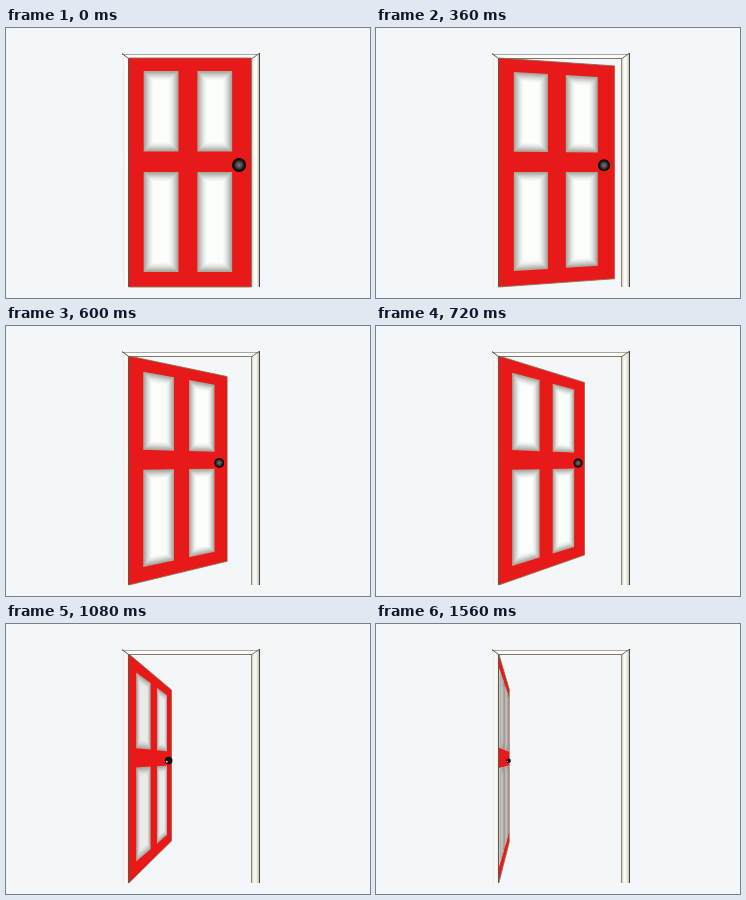
An HTML page with a canvas that plays this animation: 364x270 px, repeating every 2220 ms.

```html
<!DOCTYPE html>
<html lang="en">
<head>
<meta charset="utf-8">
<title>Opening door</title>
<style>
html, body { margin: 0; width: 100%; height: 100%; overflow: hidden; background: #f4f7fa; }
canvas { display: block; }
</style>
</head>
<body>
<canvas id="stage" width="364" height="270"></canvas>
<script>
const ctx = document.getElementById('stage').getContext('2d');
const LOOP = 2220, STEP = 60, LAST = 26;
const DOOR_W = 123, DOOR_H = 229;
const HINGE = { x: 122.8, top: 30, bottom: 259 };
const RED = [231, 25, 25], WHITE = [252, 254, 252], GREY = [192, 192, 188];

// step, right x, right top, right bottom, knob radius
const POSES = [
  [0, 245, 30, 259, 7],
  [4, 243, 33, 257.5, 6.6],
  [8, 231.5, 44, 242.5, 5.4],
  [12, 208.5, 56.5, 229, 4.6],
  [18, 165.5, 66, 217, 3.8],
  [22, 141.3, 66, 218, 2.8],
  [26, 133.3, 65.5, 218, 2.3]
];

const clamp = v => Math.max(0, Math.min(1, v));
const lerp = (a, b, k) => a + (b - a) * k;
const mix = (a, b, k) => a.map((v, i) => lerp(v, b[i], k));
const rgb = c => `rgb(${c.map(Math.round).join()})`;

function slope(i, field) {
  const a = POSES[Math.max(0, i - 1)], b = POSES[Math.min(POSES.length - 1, i + 1)];
  return i === 0 ? 0 : (b[field] - a[field]) / (b[0] - a[0]);
}

function poseAt(step) {
  let i = 0;
  while (i < POSES.length - 2 && step >= POSES[i + 1][0]) i++;
  const a = POSES[i], b = POSES[i + 1], span = b[0] - a[0];
  const k = (step - a[0]) / span, k2 = k * k, k3 = k2 * k;
  const [x, top, bottom, knob] = [1, 2, 3, 4].map(f =>
    (2 * k3 - 3 * k2 + 1) * a[f] + (k3 - 2 * k2 + k) * span * slope(i, f) +
    (3 * k2 - 2 * k3) * b[f] + (k3 - k2) * span * slope(i + 1, f));
  return { x, top, bottom, knob };
}

// Maps flat door coordinates onto the swung door in perspective.
function projector(pose) {
  const depth = DOOR_H / (pose.bottom - pose.top);
  return (x, y) => {
    const u = x / DOOR_W, v = y / DOOR_H;
    const s = u * depth / (1 - u + u * depth);
    return [lerp(HINGE.x, pose.x, s),
      lerp(lerp(HINGE.top, pose.top, s), lerp(HINGE.bottom, pose.bottom, s), v)];
  };
}

function polygon(points, fill) {
  ctx.beginPath();
  points.forEach(p => ctx.lineTo(...p));
  ctx.closePath();
  ctx.fillStyle = fill;
  ctx.fill();
}

function disc(x, y, r, fill) {
  ctx.beginPath();
  ctx.arc(x, y, r, 0, Math.PI * 2);
  ctx.fillStyle = fill;
  ctx.fill();
}

function line(x1, y1, x2, y2, color, width = 1) {
  ctx.beginPath();
  ctx.moveTo(x1, y1);
  ctx.lineTo(x2, y2);
  ctx.strokeStyle = color;
  ctx.lineWidth = width;
  ctx.stroke();
}

function gradient(x1, x2, colors) {
  const g = ctx.createLinearGradient(x1, 0, x2, 0);
  colors.forEach((c, i) => g.addColorStop(i / (colors.length - 1), c));
  return g;
}

function drawFrame(step) {
  const cream = rgb(mix([253, 253, 251], [240, 239, 230], clamp(step / 12)));
  polygon([[116, 26], [253, 26], [246, 30], [122, 30]], '#fcfcfa');
  polygon([[117, 27], [122, 30], [122, 259], [117, 259]],
    gradient(117, 122, ['#e9e8e2', '#fbfbf7', cream]));
  polygon([[246, 30], [253, 26], [253, 259], [246, 259]],
    gradient(246, 253, ['#d6d2c6', '#fcfcf8', cream, '#c4c0b4']));

  line(116, 26.5, 253, 26.5, '#a9a7a1');
  line(122, 30.5, 246, 30.5, '#80766a');
  line(245.5, 31, 245.5, 259, '#8a8376');
  line(253.5, 25, 253.5, 259, '#48453f');
  line(116, 25.5, 122.5, 30.5, '#57534c');
  line(253, 25.5, 246, 30.5, '#6e695f');
}

function drawDoor(step) {
  const pose = poseAt(step), at = projector(pose);
  const rect = (x1, y1, x2, y2, color) =>
    polygon([at(x1, y1), at(x2, y1), at(x2, y2), at(x1, y2)], color);
  const dim = clamp((step - 10) / 12) ** 3;
  const fade = clamp((step - 22) / 4);
  const core = mix(WHITE, GREY, dim);

  rect(0, 0, DOOR_W, DOOR_H, rgb(RED));
  line(...at(0, 0), ...at(DOOR_W, 0), '#8d6a50', 0.9);
  line(...at(0, DOOR_H), ...at(DOOR_W, DOOR_H), '#8d7752', 0.9);
  line(...at(DOOR_W, 0), ...at(DOOR_W, DOOR_H), '#a34a38', 0.6);

  for (const [y1, y2] of [[13, 93.5], [114, 214]]) {
    if (fade) rect(0, y1, DOOR_W, y2, rgb(mix(RED, [205, 196, 192], fade)));
    for (const x of [15, 69]) {
      rect(x, y1, x + 35, y2, '#b3a795');
      for (let i = 1; i <= 10; i++) {
        const k = 1 - (1 - i / 10) ** 1.6;
        rect(x + i, y1 + i, x + 35 - i, y2 - i, rgb(mix([160, 162, 158], core, k)));
      }
      line(...at(x + 35, y1), ...at(x + 35, y2), `rgba(90,86,80,${fade * 0.7})`, 0.8);
    }
  }
  line(122.5, 30, 122.5, 259, '#5c584e');
  drawKnob(at(111, 107), pose.knob);
}

function drawKnob([x, y], r) {
  const shine = ctx.createRadialGradient(x, y, 0, x, y, r);
  shine.addColorStop(0, '#777');
  shine.addColorStop(0.45, '#444');
  shine.addColorStop(0.8, '#0c0c0c');
  shine.addColorStop(1, '#000');
  const edgeOn = r < 4;
  disc(x, y, r, edgeOn ? '#111' : shine);
  if (edgeOn) disc(x - r * 0.5, y + r * 0.3, r * 0.25, '#d8d8d8');
}

function draw(time) {
  const step = Math.min(LAST, Math.floor(time % LOOP / STEP));
  ctx.fillStyle = '#f4f7fa';
  ctx.fillRect(0, 0, 364, 270);
  drawFrame(step);
  drawDoor(step);
}

const start = performance.now();
function tick() {
  draw(performance.now() - start);
  requestAnimationFrame(tick);
}
tick();
</script>
</body>
</html>
```
